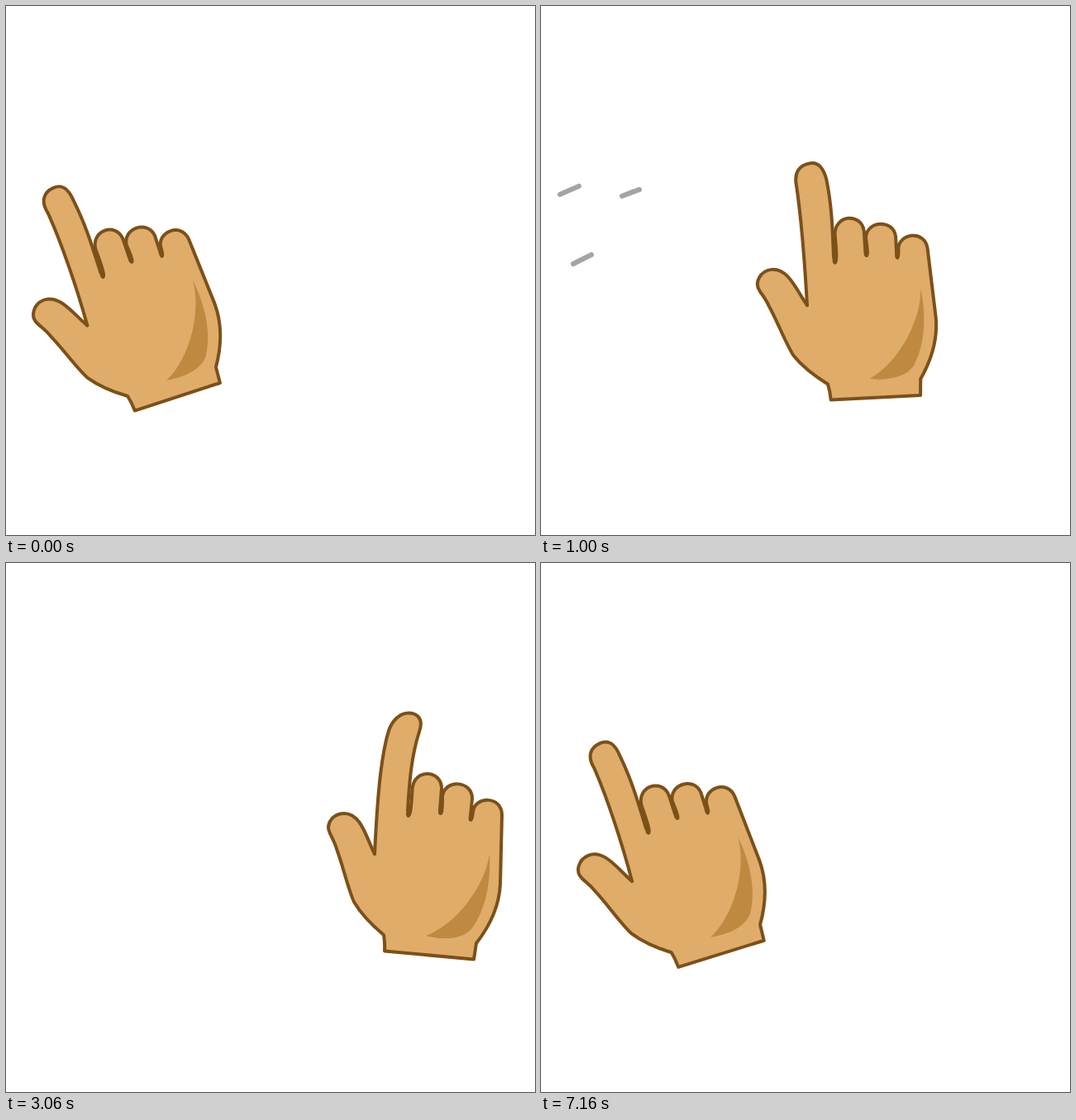
Recreate the animation shown at these times as an HTML page without scripts. Size 640 px wide and 640 px high, loop 7360 ms.

```html
<!DOCTYPE html>
<html lang="en">
<head>
<meta charset="utf-8">
<title>Swipe gesture</title>
<style>
@property --i { syntax: "<number>"; inherits: true; initial-value: 0; }

html, body { margin: 0; width: 100%; height: 100%; overflow: hidden; background: #fff; }

/* --i counts drawn poses; everything else is computed from it */
svg {
  display: block; width: 100%; height: 100%;
  animation: tick 7360ms step-end infinite;
  --go: clamp(0, var(--i) / 15.05, 1);
  --back: clamp(0, (var(--i) - 56) / 9, 1);
  --away: calc(1 - var(--go) * var(--go) * (3 - 2 * var(--go))
                 + var(--back) * var(--back) * (3 - 2 * var(--back)));
  --grow: clamp(0, (var(--i) - 8) / 5.8, 1);
  --head: max(.015, var(--grow) * var(--grow) * (3 - 2 * var(--grow)));
  --tail: clamp(0, (var(--i) - 18) / 8.5, 1);
}

.hand {
  fill: #e0ac69; stroke: #7b511a; stroke-width: 4;
  stroke-linecap: round; stroke-linejoin: round;
  transform-origin: 458px 470px;
  transform: translate(calc(var(--away) * -302px), calc(var(--away) * 20px))
             rotate(calc(var(--away) * -23.3deg));
}
.join { stroke: none; }
.shade { fill: #bf8942; stroke: none; }
.finger { animation: bend 7360ms infinite; }

.trails {
  fill: none; stroke: #a5a4a5; stroke-width: 6; stroke-linecap: round;
  opacity: min(var(--i) - 7, 27 - var(--i));
  stroke-dasharray: calc((var(--head) - var(--tail)) * 100px) 300px;
  stroke-dashoffset: calc(var(--tail) * -100px);
}

@keyframes tick {
  0% { --i: 0 }
  1.63% { --i: 1 }
  3.53% { --i: 2 }
  4.07% { --i: 3 }
  5.97% { --i: 4 }
  7.6% { --i: 5 }
  9.23% { --i: 6 }
  11.14% { --i: 7 }
  11.68% { --i: 8 }
  13.58% { --i: 9 }
  15.21% { --i: 10 }
  16.84% { --i: 11 }
  18.75% { --i: 12 }
  19.29% { --i: 13 }
  21.19% { --i: 14 }
  22.82% { --i: 15 }
  24.45% { --i: 16 }
  26.35% { --i: 17 }
  26.9% { --i: 18 }
  28.8% { --i: 19 }
  30.43% { --i: 20 }
  32.06% { --i: 21 }
  33.96% { --i: 22 }
  34.51% { --i: 23 }
  36.41% { --i: 24 }
  38.04% { --i: 25 }
  39.67% { --i: 26 }
  41.57% { --i: 27 }
  87.22% { --i: 57 }
  87.77% { --i: 58 }
  89.67% { --i: 59 }
  91.3% { --i: 60 }
  92.93% { --i: 61 }
  94.83% { --i: 62 }
  95.38% { --i: 63 }
  97.28%, 100% { --i: 64 }
}

/* the index finger lags behind the palm, then settles */
@keyframes bend {
  0%, 95.38%, 100% {
    d: path("M486 300C489 270 492.5 240 490.5 207C490.5 191 486 183 474.5 183C461 183 453.5 192 456 208C457 245 452.5 305 446 352");
    animation-timing-function: steps(4);
  }
  5.97%, 9.23% {
    d: path("M486 300C491 282 488.5 245 482 207C478 192 473 183.5 464.5 183.5C450 183.5 441.5 196 445.5 210C451 245 455 305 446 352");
    animation-timing-function: steps(3);
  }
  13.58% {
    d: path("M486 300C489 270 493 240 491 205C489.5 191 484 182.5 474.5 182.5C461 182.5 453 191 454 207C454 240 451.5 290 446 352");
    animation-timing-function: steps(6);
  }
  22.82% {
    d: path("M486 300C488 262 492 230 497 205C502 187 493 181.5 482 181.5C471 181.5 463 191 460 206C452 245 450 290 446 352");
    animation-timing-function: steps(3);
  }
  26.9%, 92.93% {
    d: path("M486 300C488 262 491 232 500 204C506 187 496 181.5 487 181.5C476 181.5 467 191 463 203C453 235 449 290 446 352");
    animation-timing-function: steps(2);
  }
}
</style>
</head>
<body>
<svg viewBox="0 0 640 640">
  <g class="trails">
    <path pathLength="100" d="M23 228Q160 165 329 157"/>
    <path pathLength="100" d="M98 230Q222 181 376 182"/>
    <path pathLength="100" d="M39 312Q174 241 337 232"/>
  </g>
  <g class="hand">
    <path class="join" d="M456 300H486L476 340L446 352Z"/>
    <path d="M446 352C436 333 430 303 409 303C396 303 386.5 315 391.5 326C394 332 398 338 400 346
      C408 367 413 392 421 410C431 427 445 440 457 450Q458.5 459 458 469.5L566 479.5L569 460
      C587 437 597 412 598 388L600 305C600 281 567 282 565 301
      Q564 311 562.5 311Q561 311 562 306L564 285C564 263 531 261 528 282
      Q528 303 526 303Q524.5 303 525 298L527 273C527 250 494 248 491.5 273
      Q490 306 487 306Q485.5 306 486 300"/>
    <path class="finger" d="M486 300C489 270 492.5 240 490.5 207C490.5 191 486 183 474.5 183C461 183 453.5 192 456 208C457 245 452.5 305 446 352"/>
    <path class="shade" d="M585 352C587 392 578 423 563 443C551 456 528 456 508 451C545 437 579 392 585 352Z"/>
  </g>
</svg>
</body>
</html>
```
